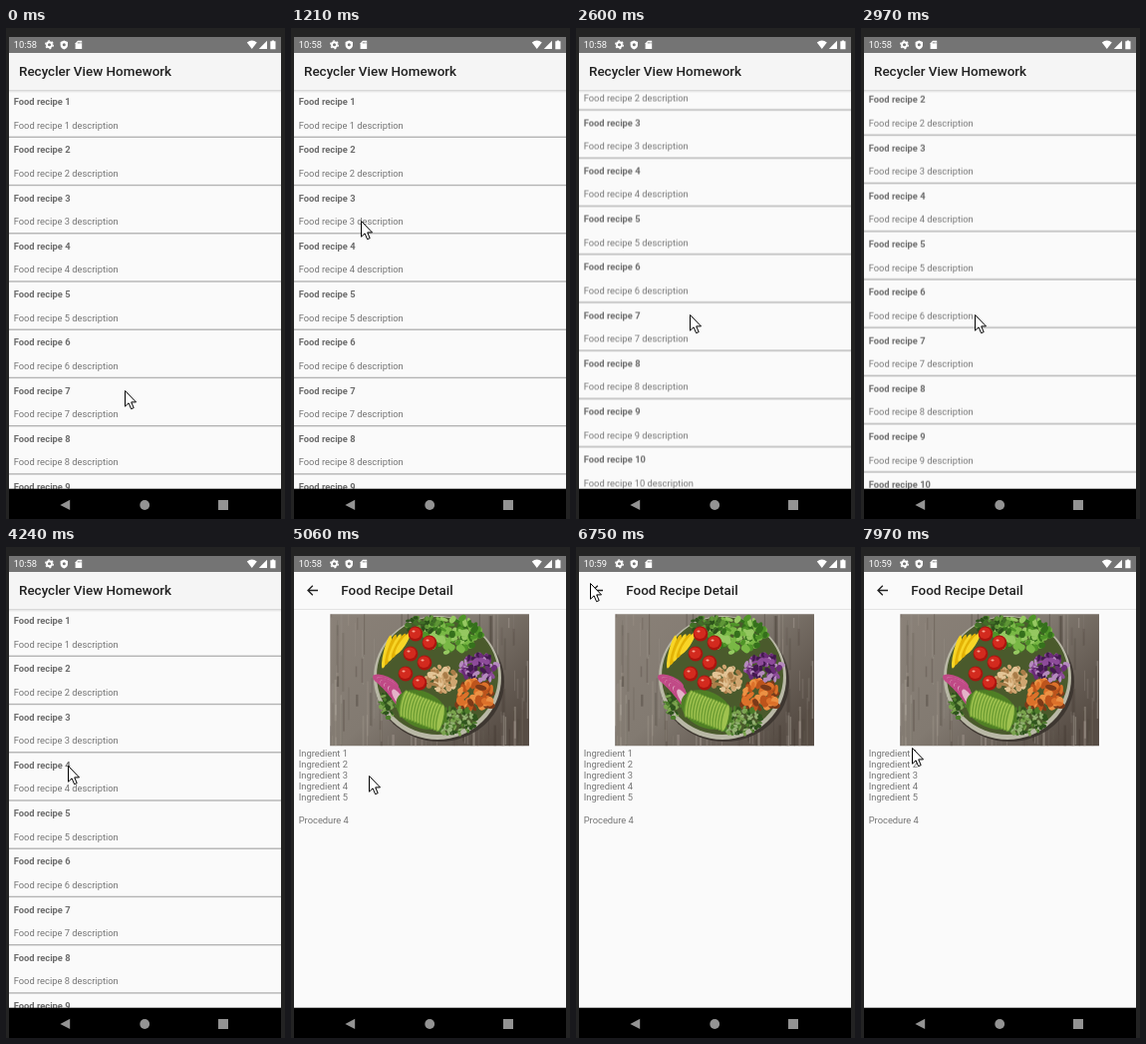
Animation, 280 px wide and 492 px high, one loop 8 s. Source, as an HTML page:

```html
<!DOCTYPE html>
<html lang="en">
<head>
<meta charset="utf-8">
<title>Recycler View Homework</title>
<style>
  html, body { margin: 0; width: 100%; height: 100%; overflow: hidden; background: #232323; }
  svg { display: block; width: 280px; height: 492px; }
  text { font: 9.35px Roboto, sans-serif; fill: #757575; white-space: pre; }
  .name { font-weight: 700; fill: #6c6c6c; }
  .title { font-size: 13.45px; font-weight: 500; fill: #212121; }
  .clock { fill: #fff; }
</style>
</head>
<body>
<svg viewBox="0 0 280 492">
  <defs>
    <clipPath id="listArea"><rect x="3" y="62" width="273" height="400"/></clipPath>
    <clipPath id="photoArea"><rect x="39.3" y="67.3" width="199.7" height="132"/></clipPath>
    <linearGradient id="wood" x2="1" y2=".7">
      <stop offset="0" stop-color="#8a8178"/>
      <stop offset=".5" stop-color="#827a71"/>
      <stop offset="1" stop-color="#574d45"/>
    </linearGradient>
    <linearGradient id="barShade" x2="0" y2="1">
      <stop offset="0" stop-color="#000" stop-opacity=".16"/>
      <stop offset="1" stop-color="#000" stop-opacity="0"/>
    </linearGradient>
  </defs>

  <rect width="280" height="492" fill="#232323"/>
  <rect x="3" y="25" width="273" height="437" fill="#fafafa"/>

  <g id="listPage">
    <g clip-path="url(#listArea)"><g id="rows"></g></g>
    <rect x="3" y="25" width="273" height="37" fill="#f5f5f5"/>
    <rect x="3" y="62" width="273" height="3" fill="url(#barShade)"/>
    <text class="title" x="13" y="48.4">Recycler View Homework</text>
  </g>

  <g id="detailPage">
    <rect x="3" y="25" width="273" height="437" fill="#fafafa"/>
    <rect x="3" y="62" width="273" height="1" fill="#e3e3e3"/>
    <path d="M27 43.5H17.2M21.8 38.7L17 43.5l4.8 4.8" fill="none" stroke="#212121" stroke-width="1.35"/>
    <text class="title" x="50.3" y="48.4">Food Recipe Detail</text>
    <g id="photo" clip-path="url(#photoArea)"></g>
    <g id="steps"></g>
  </g>

  <rect x="3" y="9" width="273" height="16" fill="#747474"/>
  <text class="clock" id="early" x="7.7" y="20.2">10:58</text>
  <text class="clock" id="late" x="7.7" y="20.2">10:59</text>
  <g fill="#fff">
    <circle cx="43.5" cy="16.8" r="2.5" fill="none" stroke="#fff" stroke-width="1.9"/>
    <circle cx="43.5" cy="16.8" r="3.9" fill="none" stroke="#fff" stroke-width="1.2" stroke-dasharray="2 2.08"/>
    <path d="M58.3 12.4l3.7 1.5v3q0 3-3.7 4.7q-3.7-1.7-3.7-4.7v-3z"/>
    <circle cx="58.3" cy="16.7" r="1.5" fill="#747474"/>
    <path d="M72 12.8h4.2v8.3h-6.6v-5.8z"/>
    <path d="M72.3 14v1.6M73.7 14v1.6M75.1 14v1.6" stroke="#747474" stroke-width=".7"/>
    <path d="M241.8 14.6q5-4 10 0l-5 6.4z"/>
    <path d="M262 12.8v8.2h-8.2z"/>
    <path d="M266.8 12.4h2.2v.9h1.5v7.9h-5.2v-7.9h1.5z"/>
  </g>

  <rect x="3" y="461.7" width="273" height="31" fill="#000"/>
  <g fill="#939393">
    <path d="M64.2 472.8v10.2l-9.8-5.1z"/>
    <circle cx="139.2" cy="478" r="4.9"/>
    <rect x="213" y="473" width="10" height="10"/>
  </g>

  <path id="cursor" d="M.5.5v15.7l3.6-3.4 2.5 5.9 2.6-1.1-2.5-5.7h4.8z" fill="#fff" stroke="#000" stroke-linejoin="round"/>
</svg>

<script>
const LOOP = 8000, TICK = 140;
const $ = id => document.getElementById(id);

function add(parent, tag, attrs, content) {
  const el = document.createElementNS('http://www.w3.org/2000/svg', tag);
  for (const key in attrs) el.setAttribute(key, attrs[key]);
  if (content) el.textContent = content;
  parent.append(el);
  return el;
}

// Recipe list
const LEFT = 7.7, ROW = 48.23, LINE = 10.85;
for (let i = 0; i < 10; i++) {
  const y = i * ROW, label = `Food recipe ${i + 1}`;
  add($('rows'), 'text', { class: 'name', x: LEFT, y: 77.2 + y }, label);
  add($('rows'), 'text', { x: LEFT, y: 100.8 + y }, `${label} description`);
  add($('rows'), 'rect', { x: 3, y: 108.6 + y, width: 273, height: 1.4, fill: '#b4b4b4' });
}

// Recipe detail
for (let i = 0; i < 5; i++)
  add($('steps'), 'text', { x: LEFT, y: 210.2 + i * LINE }, `Ingredient ${i + 1}`);
add($('steps'), 'text', { x: LEFT, y: 276.8 }, 'Procedure 4');

// Salad bowl on a wooden table
let seed = 7;
const random = (min = 0, max = 1) =>
  min + (max - min) * (seed = seed * 16807 % 2147483647) / 2147483647;
const photo = $('photo');
const oval = (cx, cy, rx, ry, fill, turn = 0) =>
  add(photo, 'ellipse', { cx, cy, rx, ry, fill, transform: `rotate(${turn} ${cx} ${cy})` });

function scatter(cx, cy, rx, ry, count, size, colors) {
  for (let i = 0; i < count; i++) {
    const angle = random(0, 2 * Math.PI), reach = Math.sqrt(random());
    oval(cx + rx * reach * Math.cos(angle), cy + ry * reach * Math.sin(angle),
      size * random(.7, 1.3), size * random(.4, .9), colors[i % colors.length], random(0, 180));
  }
}

add(photo, 'rect', { x: 39, y: 67, width: 200, height: 133, fill: 'url(#wood)' });
for (let i = 0; i < 160; i++)
  add(photo, 'rect', {
    x: random(39, 239), y: random(55, 190), width: random(.5, 2.5), height: random(10, 60),
    fill: i % 2 ? '#b3aaa0' : '#40372f', opacity: random(.1, .4)
  });

oval(149, 135, 65, 60, '#3e3731');
oval(147, 131, 64, 62, '#b9b8a6');
oval(147, 129, 61, 59, '#4a5a2c');
scatter(162, 88, 28, 18, 110, 4, ['#4f9428', '#79b845', '#35701c', '#95c861']);
scatter(131, 78, 18, 8, 40, 3, ['#416f27', '#5f9636', '#2c521b']);
scatter(189, 121, 19, 14, 80, 3, ['#6b2c78', '#8d4b9a', '#43194f', '#b58abd']);
scatter(151, 133, 15, 13, 70, 3.2, ['#d0a671', '#e3c496', '#a97d49']);
scatter(184, 150, 19, 16, 55, 4.5, ['#dd712a', '#ec9144', '#bd541c', '#7b3a19']);
scatter(163, 174, 23, 14, 120, 2.4, ['#4c7d2b', '#7aa34e', '#2f541d', '#93b172']);
scatter(99, 158, 10, 14, 40, 2.6, ['#4c7d2b', '#7aa34e', '#2f541d']);

for (let i = 0; i < 5; i++) {
  oval(96 + i * 4, 105 - i * 2, 3, 17 - i, i % 2 ? '#e3b306' : '#f8d526', 14 + i * 5);
  oval(95 + i * 3, 135 + i * 4, 14, 5.5, '#c04a86', 24 + i * 8);
  oval(96 + i * 3, 136 + i * 4, 11, 3.8, '#e3b3c8', 24 + i * 8);
}
oval(131, 163, 27, 18, '#4f7f25', 24);
for (let i = 0; i < 14; i++) {
  oval(113 + i * 2.8, 157 + i * 1.1, 3.6, 14, '#6d9d32', 12);
  oval(113.6 + i * 2.8, 157 + i * 1.1, 2.7, 13, '#9fc24f', 12);
}
for (let i = 0; i < 6; i++) {
  const x = 125 - (i >> 1) * 5 + (i % 2) * 14, y = 87 + (i >> 1) * 20 + (i % 2) * 9;
  oval(x, y, 7.4, 7.4, '#a9150f');
  oval(x - .6, y - .8, 6, 5.8, '#d32a1e');
  oval(x - 2, y - 2.5, 1.6, 1.1, '#f7a18f');
}

// Motion: every leg between two key poses advances in screen refreshes of about one TICK
const start = document.timeline.currentTime || 0;
const move = (x, y) => ({ transform: `translate(${x}px, ${y}px)` });

function travel(el, legs) {
  const frames = legs.map(([time, x, y], i) => {
    const span = (i + 1 < legs.length ? legs[i + 1][0] : LOOP) - time;
    const ticks = Math.max(1, Math.round(span / TICK));
    return { offset: time / LOOP, easing: `steps(${ticks}, start)`, ...move(x, y) };
  });
  el.animate(frames, { duration: LOOP, iterations: Infinity }).startTime = start;
}

function swap(before, after, time) {
  const visibility = (from, to) => [
    { offset: 0, visibility: from, easing: 'steps(1, end)' },
    { offset: time / LOOP, visibility: to, easing: 'steps(1, end)' },
    { offset: 1, visibility: to }
  ];
  const timing = { duration: LOOP, iterations: Infinity };
  before.animate(visibility('visible', 'hidden'), timing).startTime = start;
  after.animate(visibility('hidden', 'visible'), timing).startTime = start;
}

travel($('cursor'), [
  [0, 119, 363], [120, 119, 363], [750, 57, 106], [1350, 70, 193],
  [1900, 114, 287], [3670, 114, 287], [4100, 10, 72], [4380, 62, 219],
  [4640, 62, 219], [4780, 108, 277], [4920, 108, 277], [5200, 78, 229],
  [6090, 81, 247], [6880, 14, 36], [7020, 10, 30], [7420, 10, 30], [LOOP, 51, 201]
]);
travel($('rows'), [
  [0, 0, 0], [1350, 0, 0], [1900, 0, -82], [2600, 0, -82], [2740, 0, -75.5], [3530, 0, 0], [LOOP, 0, 0]
]);
swap($('listPage'), $('detailPage'), 4920);
swap($('early'), $('late'), 5500);
</script>
</body>
</html>
```
